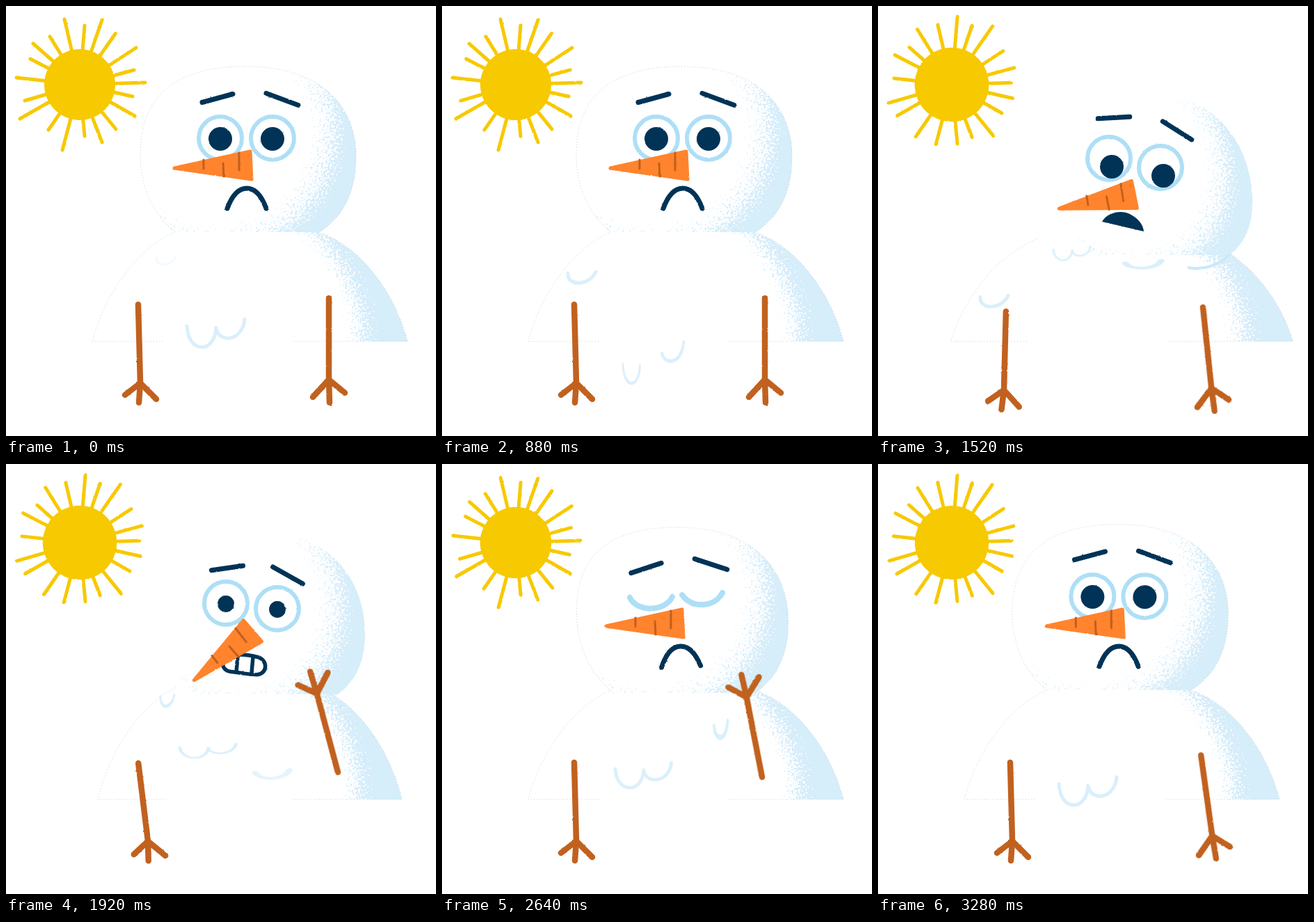
Recreate the animation shown at these times as an HTML page without scripts. Size 618 by 618 pixels, loop 3360 ms.

```html
<!DOCTYPE html>
<html lang="en">
<head>
<meta charset="utf-8">
<title>Melting snowman</title>
<style>
  @property --f { syntax: '<number>'; inherits: true; initial-value: 0; }
  /* pose weights: a crouch, b shock, c worry, d sigh */
  @property --a { syntax: '<number>'; inherits: true; initial-value: 0; }
  @property --b { syntax: '<number>'; inherits: true; initial-value: 0; }
  @property --c { syntax: '<number>'; inherits: true; initial-value: 0; }
  @property --d { syntax: '<number>'; inherits: true; initial-value: 0; }

  html, body { margin: 0; width: 100%; height: 100%; overflow: hidden; background: #fff; }
  svg {
    display: block; width: 100vw; height: 100vh;
    animation: tick 3.36s steps(42) infinite, pose 3.36s infinite;
  }
  @keyframes tick { from { --f: 0; } to { --f: 42; } }
  @keyframes pose {
    0%      { --a: 0; --b: 0; --c: 0; --d: 0; animation-timing-function: steps(12); }
    28.571% { --a: 0; --b: 0; --c: 0; --d: 0; animation-timing-function: steps(7); }
    45.238% { --a: 1; --b: 0; --c: 0; --d: 0; animation-timing-function: steps(3); }
    52.381% { --a: 1.4; --b: 0; --c: 0; --d: 0; animation-timing-function: steps(2); }
    57.143% { --a: 0; --b: 1; --c: 0; --d: 0; animation-timing-function: steps(5); }
    69.047% { --a: 0; --b: 0; --c: 1; --d: 0; animation-timing-function: steps(4); }
    78.571% { --a: 0; --b: 0; --c: 0; --d: 1; animation-timing-function: steps(3); }
    85.714% { --a: 0; --b: 0; --c: 0; --d: 1; animation-timing-function: steps(3); }
    92.857% { --a: 0; --b: 0; --c: 0; --d: 0; animation-timing-function: steps(2); }
    97.619% { --a: 0; --b: 0; --c: 0; --d: -.047; animation-timing-function: steps(1); }
    100%    { --a: 0; --b: 0; --c: 0; --d: 0; }
  }

  .move {
    transform-box: fill-box; transform-origin: center;
    transform: translate(calc(1px * (var(--x))), calc(1px * (var(--y)))) rotate(calc(1deg * (var(--r))));
  }
  .line { fill: none; stroke-linecap: round; stroke-linejoin: round; }
  .ink { stroke: #003356; stroke-width: 7; }
  .ice { stroke: #aedff6; stroke-width: 6; }
  .wood { stroke: #c1611f; stroke-width: 8.5; }
  .dots { fill: none; stroke: #b5b5b5; stroke-width: .7; stroke-dasharray: 1 3; }

  .sun { --s: calc(.5 - .5 * cos(var(--f) * 1turn / 5.4)); fill: #f7c900; stroke: #f7c900; }
  .sun > * { transform-origin: 106px 113px; vector-effect: non-scaling-stroke; stroke-width: 5; }
  .sun circle { stroke: none; transform: scale(calc(1 + .045 * var(--s))); }
  .long { transform: scale(calc(1 - .09 * var(--s))); }
  .short { transform: scale(calc(1 + .15 * var(--s))); }

  .body {
    transform-origin: 350.5px 482px;
    transform: scale(
      calc(1 + .086 * var(--a) - .035 * var(--b) + .018 * var(--c)),
      calc(1 - .05 * var(--a) + .03 * var(--b) - .02 * var(--c)));
  }
  /* the head leans by shearing from its crown */
  .head {
    transform-origin: 345px 86px;
    transform:
      translate(calc(20px * var(--a) + 17px * var(--c) - 7px * var(--d)),
        calc(33px * var(--a) + 6px * var(--b) + 11px * var(--c) + 4px * var(--d)))
      skewX(calc(10deg * var(--a) + 7deg * var(--b) + 2.5deg * var(--c) + 2deg * var(--d)))
      scaleX(calc(1 - .07 * var(--a) - .03 * var(--b) - .04 * var(--c) - .02 * var(--d)));
  }
  .head .dots { opacity: calc(1 - var(--a) - var(--b) - var(--c)); }
  .chin { opacity: var(--a); }
  .brow-l {
    --x: 35 * var(--a) + 14 * var(--b) + 40 * var(--c) - 10.5 * var(--d);
    --y: 28 * var(--a) + 17 * var(--b) + 16.5 * var(--c) + 17 * var(--d);
    --r: 12 * var(--a) + 7 * var(--b) + 10 * var(--c) - 3 * var(--d);
  }
  .brow-r {
    --x: 33 * var(--a) + 8 * var(--b) + 27 * var(--c) - 10.5 * var(--d);
    --y: 45 * var(--a) + 26 * var(--b) + 31.5 * var(--c) + 10 * var(--d);
    --r: 12 * var(--a) + 9 * var(--b) + 15 * var(--c) - 2 * var(--d);
  }
  .eye-l {
    --x: 24 * var(--a) + 8 * var(--b) + 22 * var(--c) - 8 * var(--d);
    --y: 29 * var(--a) + 10 * var(--b) + 17 * var(--c);
    --r: 0;
  }
  .eye-r {
    --x: 23 * var(--a) + 7 * var(--b) + 21 * var(--c) - 9 * var(--d);
    --y: 42 * var(--a) + 18 * var(--b) + 30 * var(--c) - 4 * var(--d);
    --r: 0;
  }
  .eyes { opacity: calc(999 * (.6 - var(--d))); }
  .lids { opacity: calc(999 * (var(--d) - .6)); stroke-width: 8; }
  .pupil {
    fill: #003356; transform-box: fill-box; transform-origin: center;
    transform: translate(calc(4px * var(--a)), calc(11px * var(--a))) scale(calc(1 - .3 * (var(--b) + var(--c))));
  }
  .nose {
    --x: 17 * var(--a) + 14 * var(--b) + 15 * var(--c) - 6 * var(--d);
    --y: 50 * var(--a) + 44.5 * var(--b) + 19 * var(--c);
    --r: -8.5 * var(--a) - 38 * var(--b) + 3.4 * var(--c);
  }
  .frown {
    --x: 5 * var(--a) - 3 * var(--d);
    --y: 25 * var(--a);
    --r: 10 * var(--a) - 2.5 * var(--d);
    opacity: calc(999 * min(.35 - var(--a), .5 - var(--b) - var(--c)));
  }
  .gasp {
    --x: 23 * (var(--a) - 1); --y: 35 * (var(--a) - 1); --r: 0;
    opacity: calc(999 * min(var(--a) - .35, .4 - var(--b)));
  }
  .teeth {
    --x: -6 * var(--b); --y: -5 * var(--b); --r: -5 * var(--b);
    opacity: calc(999 * (var(--b) + var(--c) - .45));
  }
  .arm-l {
    transform-box: view-box; transform-origin: 190px 427px;
    --x: -6 * var(--a);
    --y: 10 * var(--a) + var(--b) + var(--c);
    --r: 3 * var(--a) - 5.5 * var(--b) - 2.2 * var(--c);
  }
  .arm-r {
    transform-box: view-box; transform-origin: 464px 420px;
    --x: 3 * var(--a) + 13 * var(--b) + var(--c) - 4 * var(--d);
    --y: 13 * var(--a) + 23 * var(--b) + 33 * var(--c) + 30 * var(--d);
    --r: -6 * var(--a) + 165 * var(--b) + 177.5 * var(--c) + 169 * var(--d);
  }

  .drips { stroke: #d9effb; stroke-width: 5; }
  .drips * { animation: 3.36s linear infinite; }
  .drips .pair { animation-name: slide; transform-origin: 260px 460px; }
  .pair :first-child { animation-name: fall-l; transform-origin: 260px 460px; }
  .pair :last-child { animation-name: fall-r; transform-origin: 303px 460px; }
  .drips .left { animation-name: left; transform-origin: 181px 384px; }
  .drips .right { animation-name: right; transform-origin: 381px 347px; }
  @keyframes slide {
    0%, 34% { transform: none; opacity: 1; }
    34.1% { transform: translate(-8px, -135px) scale(.6); opacity: 0; }
    40% { opacity: 1; }
    45.238% { transform: translate(-8px, -110px) scale(.64, .5); }
    57.143% { transform: translate(-10px, -53px) scale(.97, .5); }
    69.048% { transform: translate(-30px, -37px) scale(1, .75); }
    78.571% { transform: translate(-11px, -22px) scale(.97, .9); }
    97.619%, 100% { transform: none; opacity: 1; }
  }
  @keyframes fall-l {
    0% { transform: none; opacity: 1; }
    26.19% { transform: translate(0, 55px) scale(.58, .9); opacity: 1; }
    33% { transform: translate(0, 68px) scale(.5, .8); opacity: 0; }
    34.2%, 100% { transform: none; opacity: 1; }
  }
  @keyframes fall-r {
    0% { transform: none; opacity: 1; }
    26.19% { transform: translate(13px, 33px) scale(.78, 1); opacity: 1; }
    33% { transform: translate(16px, 45px) scale(.6, .8); opacity: 0; }
    34.2%, 100% { transform: none; opacity: 1; }
  }
  @keyframes left {
    0% { transform: translate(35px, -22px) scale(.7); opacity: .3; }
    26.19% { transform: none; opacity: 1; }
    45.238% { transform: translate(-34px, 34px); opacity: 1; }
    50% { transform: translate(-42px, 44px); opacity: 0; }
    53% { transform: translate(45px, -60px) scale(.5, .8); opacity: 0; }
    57.143% { transform: translate(41px, -50px) scale(.5, 1); opacity: 1; }
    69.048% { transform: translate(32px, -14px) scale(.42, 1.2); opacity: 1; }
    76% { transform: translate(28px, 4px) scale(.42, 1.2); opacity: 0; }
    97.6% { transform: translate(35px, -22px) scale(.7); opacity: 0; }
    100% { transform: translate(35px, -22px) scale(.7); opacity: .3; }
  }
  @keyframes right {
    0%, 38% { transform: translate(-26px, 8px) scale(2, .7); opacity: 0; }
    45.238% { transform: translate(-26px, 22px) scale(2, .7); opacity: 1; }
    57.143% { transform: translate(-23px, 96px) scale(1.9, .8); opacity: .7; }
    60% { transform: translate(-23px, 110px) scale(1.9, .8); opacity: 0; }
    63% { transform: translate(-2px, -20px); opacity: 0; }
    69.048% { transform: none; opacity: 1; }
    78.571% { transform: translate(10px, 30px) scale(.75, 1.5); opacity: 1; }
    87%, 100% { transform: translate(12px, 55px) scale(.75, 1.5); opacity: 0; }
  }
</style>
</head>
<body>
<svg viewBox="0 0 618 618">
  <defs>
    <filter id="rough" x="-20%" y="-20%" width="140%" height="140%" color-interpolation-filters="sRGB">
      <feTurbulence type="fractalNoise" baseFrequency=".3" numOctaves="2" seed="4"/>
      <feDisplacementMap in="SourceGraphic" scale="2" xChannelSelector="R" yChannelSelector="G"/>
    </filter>
    <filter id="grain" color-interpolation-filters="sRGB">
      <feTurbulence type="fractalNoise" baseFrequency=".32" numOctaves="3" seed="9"/>
      <feColorMatrix values="0 0 0 0 0  0 0 0 0 0  0 0 0 0 0  2 0 0 0 -.5" result="noise"/>
      <feComposite in="SourceGraphic" in2="noise" operator="arithmetic" k2="1.3" k3="1" k4="-.6"/>
      <feComponentTransfer result="mask"><feFuncA type="linear" slope="4" intercept="-1.5"/></feComponentTransfer>
      <feFlood flood-color="#d6edfa"/>
      <feComposite in2="mask" operator="in"/>
    </filter>
    <radialGradient id="headTone" gradientUnits="userSpaceOnUse" cx="300" cy="180" r="215">
      <stop offset=".6" stop-opacity="0"/>
      <stop offset=".77" stop-opacity=".38"/>
      <stop offset=".94"/>
    </radialGradient>
    <radialGradient id="bodyTone" gradientUnits="userSpaceOnUse" cx="300" cy="480" r="280">
      <stop offset=".66" stop-opacity="0"/>
      <stop offset=".74" stop-opacity=".38"/>
      <stop offset=".87"/>
    </radialGradient>
    <path id="skull" d="M243 325C205 295 193 250 193 215C193 150 220 87 345 87C460 87 503 150 503 215C503 260 490 300 450 325"/>
  </defs>

  <g class="sun" filter="url(#rough)">
    <path class="long line" d="M84 19L106 113L138 20M187 60L106 113L200 110M185 158L106 113L138 196M81 207L106 113L20 162M15 103L106 113L39 54"/>
    <path class="short line" d="M113 28L106 113L157 40M184 92L106 113L182 130M158 177L106 113L113 187M61 178L106 113L27 136M35 76L106 113L63 44"/>
    <circle cx="106" cy="113" r="51"/>
  </g>

  <g class="body">
    <path d="M350 300C390 302 425 310 450 325C502 342 556 402 577 482H350Z" fill="url(#bodyTone)" filter="url(#grain)"/>
    <path class="dots" d="M225 482H124C145 402 199 342 243 325M450 325C502 342 556 402 577 482H413"/>
  </g>

  <g class="head">
    <use href="#skull" fill="#fff"/>
    <use href="#skull" fill="url(#headTone)" filter="url(#grain)"/>
    <use href="#skull" class="dots"/>
    <path class="chin line" d="M450 325C430 340 405 347 384 343" stroke="#cbe8f8" stroke-width="4"/>
  </g>

  <g class="drips line" filter="url(#rough)">
    <g class="pair">
      <path d="M260 460C262 500 300 500 302 462"/>
      <path d="M303 466C308 484 340 482 343 450"/>
    </g>
    <path class="left" d="M181 384C180 404 212 402 221 382"/>
    <path class="right" d="M381 347C384 362 404 362 407 342"/>
  </g>

  <g class="line ink" filter="url(#rough)">
    <path class="move brow-l" d="M282 138.5L326 126.5"/>
    <path class="move brow-r" d="M374 125.5L420 142.5"/>
  </g>
  <g class="eyes" filter="url(#rough)">
    <g class="move eye-l">
      <circle class="ice" cx="308" cy="190" r="31" fill="#fff"/>
      <circle class="pupil" cx="308" cy="191" r="17"/>
    </g>
    <g class="move eye-r">
      <circle class="ice" cx="383" cy="190" r="31" fill="#fff"/>
      <circle class="pupil" cx="383" cy="191" r="17"/>
    </g>
  </g>
  <path class="lids line ice" filter="url(#rough)" d="M270 192C280 213 320 213 331 191M345 188C358 208 392 207 403 185"/>

  <g filter="url(#rough)">
    <path class="move frown line ink" d="M318 291C325 272 335 262 346 262S367 272 374 291"/>
    <path class="move gasp" fill="#003356" d="M322 310C330 296 350 293 362 299C374 305 381 314 382 324Z"/>
    <g class="move teeth">
      <g class="line ink" style="stroke-width:5.5" transform="rotate(10 348 293)">
        <path fill="#fff" d="M330 281C345 278 358 279 368 281C383 285 382 305 367 306C354 307 343 305 330 305C314 305 313 284 330 281Z"/>
        <path d="M338 281V305M360 280V306"/>
      </g>
    </g>
  </g>

  <g filter="url(#rough)">
    <g class="move nose">
      <path d="M242 233L351 209L353 249Z" fill="#ff842d" stroke="#ff842d" stroke-width="5" stroke-linejoin="round"/>
      <path class="line" d="M284 221V234M312 226L313 245M335 211V236" stroke="#c25f1e" stroke-width="3"/>
    </g>
  </g>

  <g class="line wood" filter="url(#rough)">
    <path class="move arm-l" d="M190 429L193 542L171 559M193 542L191 570M193 542L216 565"/>
    <path class="move arm-r" d="M464 420V537L441 562M464 537L465 570M464 537L487 556"/>
  </g>
</svg>
</body>
</html>
```
